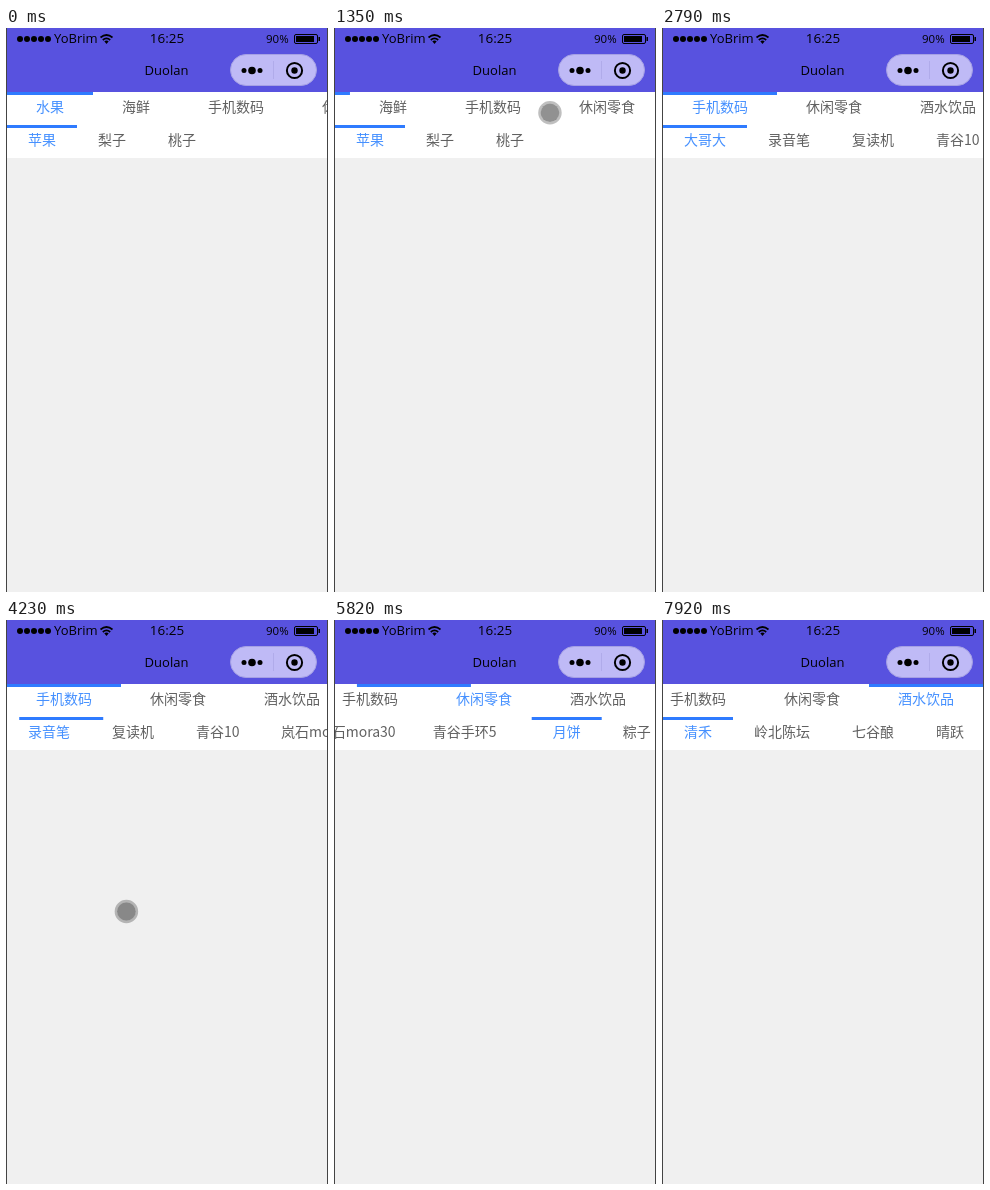
Write an HTML page that moves like this. It is 322 px wide and 564 px high and loops after 8000 ms.

```html
<!DOCTYPE html>
<html lang="zh">
<head>
<meta charset="utf-8">
<title>Tabs</title>
<style>
  html, body { margin: 0; width: 100%; height: 100%; overflow: hidden; background: #f0f0f0; }
  svg { display: block; width: 100vw; height: 100vh; }
  text { font-family: "Open Sans", "Noto Sans CJK SC", "Noto Sans CJK", sans-serif; font-size: 13px; }
  .tab { font-family: "Noto Sans CJK SC", "Noto Sans CJK", "Open Sans", sans-serif; font-size: 14px; font-weight: 300; fill: #606060; }
  .tab.on { fill: #4590ff; }
  .bar { fill: #2f7bff; }
</style>
</head>
<body>
<svg viewBox="0 0 322 564">
  <defs><clipPath id="view"><rect x="1" y="64" width="320" height="500"/></clipPath></defs>
  <rect width="322" height="564" fill="#f0f0f0"/>
  <rect y="64" width="322" height="66" fill="#fff"/>
  <g id="rows" clip-path="url(#view)"></g>

  <rect width="322" height="64" fill="#5852df"/>
  <g id="signal"></g>
  <text x="48" y="15">YoBrim</text>
  <g fill="none" stroke="#000" stroke-width="1.7">
    <path d="M94.5 9.5Q100.5 4.5 106.5 9.5"/>
    <path d="M96.8 12Q100.5 8.8 104.2 12"/>
  </g>
  <path d="M98.3 13.3Q100.5 11.6 102.7 13.3L100.5 16Z"/>
  <text x="161" y="15" text-anchor="middle" style="font-size:13.5px">16:25</text>
  <text x="260" y="15" style="font-size:11.5px">90%</text>
  <rect x="288.5" y="6.5" width="23" height="9" rx="1.5" fill="none" stroke="#000"/>
  <rect x="290" y="8" width="18" height="6"/>
  <rect x="312.5" y="9" width="1.5" height="4"/>
  <text x="160.5" y="47" text-anchor="middle">Duolan</text>

  <rect x="224.5" y="26.5" width="86" height="31" rx="15.5" fill="#bfbaf6" stroke="#a5a0e4"/>
  <path d="M267.5 33V51" stroke="#b0abea"/>
  <circle cx="238" cy="42.5" r="2.5"/>
  <circle cx="246" cy="42.5" r="3.8"/>
  <circle cx="254" cy="42.5" r="2.5"/>
  <circle cx="288.5" cy="42.5" r="7.6" fill="none" stroke="#000" stroke-width="2"/>
  <circle cx="288.5" cy="42.5" r="3.2"/>

  <path d="M.5 0V564M321.5 0V564" stroke="#444"/>
  <g id="touch">
    <circle r="10.5" fill="none" stroke="#000" stroke-opacity=".25" stroke-width="2.5"/>
    <circle r="9.3" fill-opacity=".43"/>
  </g>
</svg>
<script>
const LOOP = 8000, WIDTH = 320, PHONES = 2;
const byId = id => document.getElementById(id);
const clamp = p => Math.min(1, Math.max(0, p));
const mix = (a, b, p) => a + (b - a) * p;
const ramp = (t, from, to) => clamp((t - from) / (to - from));

function add(parent, tag, attrs, label) {
  const el = document.createElementNS("http://www.w3.org/2000/svg", tag);
  for (const k in attrs) el.setAttribute(k, attrs[k]);
  if (label) el.textContent = label;
  parent.append(el);
  return el;
}

// A row of tabs with a marker bar that can sit between two tabs.
function makeRow(y, pad, labels) {
  const group = add(byId("rows"), "g", {});
  let end = 0;
  const tabs = labels.split(" ").map(label => {
    const x = end;
    const width = 2 * pad + [...label].reduce((sum, c) => sum + (c < "\u0100" ? 7.5 : 14), 0);
    end += width;
    return { x, width, el: add(group, "text", { class: "tab", x: x + pad, y: y + 20 }, label) };
  });
  const bar = add(group, "rect", { class: "bar", y, height: 3 });

  function draw(left, active, pos) {
    const a = tabs[Math.floor(pos)], b = tabs[Math.ceil(pos)];
    group.setAttribute("transform", `translate(${left + 1})`);
    tabs.forEach((tab, i) => tab.el.classList.toggle("on", i === active));
    bar.setAttribute("x", mix(a.x, b.x, pos % 1));
    bar.setAttribute("width", mix(a.width, b.width, pos % 1));
  }
  return { draw, tabs, maxScroll: end - WIDTH };
}

for (let i = 0; i < 5; i++) add(byId("signal"), "circle", { cx: 14 + i * 7, cy: 11, r: 3 });

const topRow = makeRow(64, 29, "水果 海鲜 手机数码 休闲零食 酒水饮品");
const pages = [
  "苹果 梨子 桃子",
  "",
  "大哥大 录音笔 复读机 青谷10 岚石mora30 青谷手环5",
  "月饼 粽子",
  "清禾 岭北陈坛 七谷酿 晴跃"
].map(labels => labels && makeRow(97, 21, labels));

const TAP = 2670;
const PULL = .0016; // share of a page dragged per ms
const outer = { starts: [5730, 6570], drag: 40 };
const inner = { starts: [3390, 4140, 4500], drag: 150 };

// A swipe follows the finger, then eases out to the next page.
function swipe(u, drag) {
  const pulled = PULL * Math.min(Math.max(u, 0), drag);
  const rest = 1 - ramp(u, drag, drag + 390);
  return mix(pulled, 1, 1 - rest ** 3);
}
const position = (s, t) => s.starts.reduce((sum, start) => sum + swipe(t - start, s.drag), 0);
const released = (s, t) => s.starts.filter(start => t >= start + s.drag).length;

const scrollDrag = t => 162 * ramp(t, 930, 1890);

// Runs of [time, x, y]; the dot shows only during a run.
const runs = [
  [[120, 297, 70], [720, 144.5, 87.5], [930, 287, 92], [1890, 125, 75.5], [TAP, 66, 82]],
  [[2880, 70, 96], [3030, 100, 194]],
  [[5070, 190, 485], [5520, 208, 548], [5730, 208, 548]],
  [[6270, 100, 552], [6570, 208, 536]],
  [[7170, 205, 553], [7560, 216, 574]],
  [[7710, 79, 543], [7920, 69, 548]],
  ...inner.starts.map(s => [-90, 240].map(u => [s + u, 167 - PULL * WIDTH * u, 291.5]))
];

function touchAt(t) {
  for (const run of runs) {
    const i = run.findIndex(point => t < point[0]);
    if (i < 1) continue;
    const a = run[i - 1], b = run[i], p = ramp(t, a[0], b[0]);
    return [mix(a[1], b[1], p), mix(a[2], b[2], p)];
  }
}

function draw(t) {
  const tapped = t >= TAP ? PHONES : 0;
  const page = tapped + released(outer, t);
  const pos = tapped + position(outer, t);
  const scroll = tapped ? Math.min(topRow.tabs[page].x, topRow.maxScroll) : scrollDrag(t);
  topRow.draw(-scroll, page, pos);

  const sub = released(inner, t);
  pages.forEach((row, i) => {
    if (!row) return;
    const left = (i - pos) * WIDTH;
    if (i === PHONES) row.draw(left - row.tabs[sub].x, sub, position(inner, t));
    else row.draw(left, 0, 0);
  });

  const spot = touchAt(t), dot = byId("touch");
  dot.setAttribute("visibility", spot ? "visible" : "hidden");
  if (spot) dot.setAttribute("transform", `translate(${spot})`);
}

const start = performance.now();
function tick() {
  draw((performance.now() - start) % LOOP);
  requestAnimationFrame(tick);
}
tick();
</script>
</body>
</html>
```
